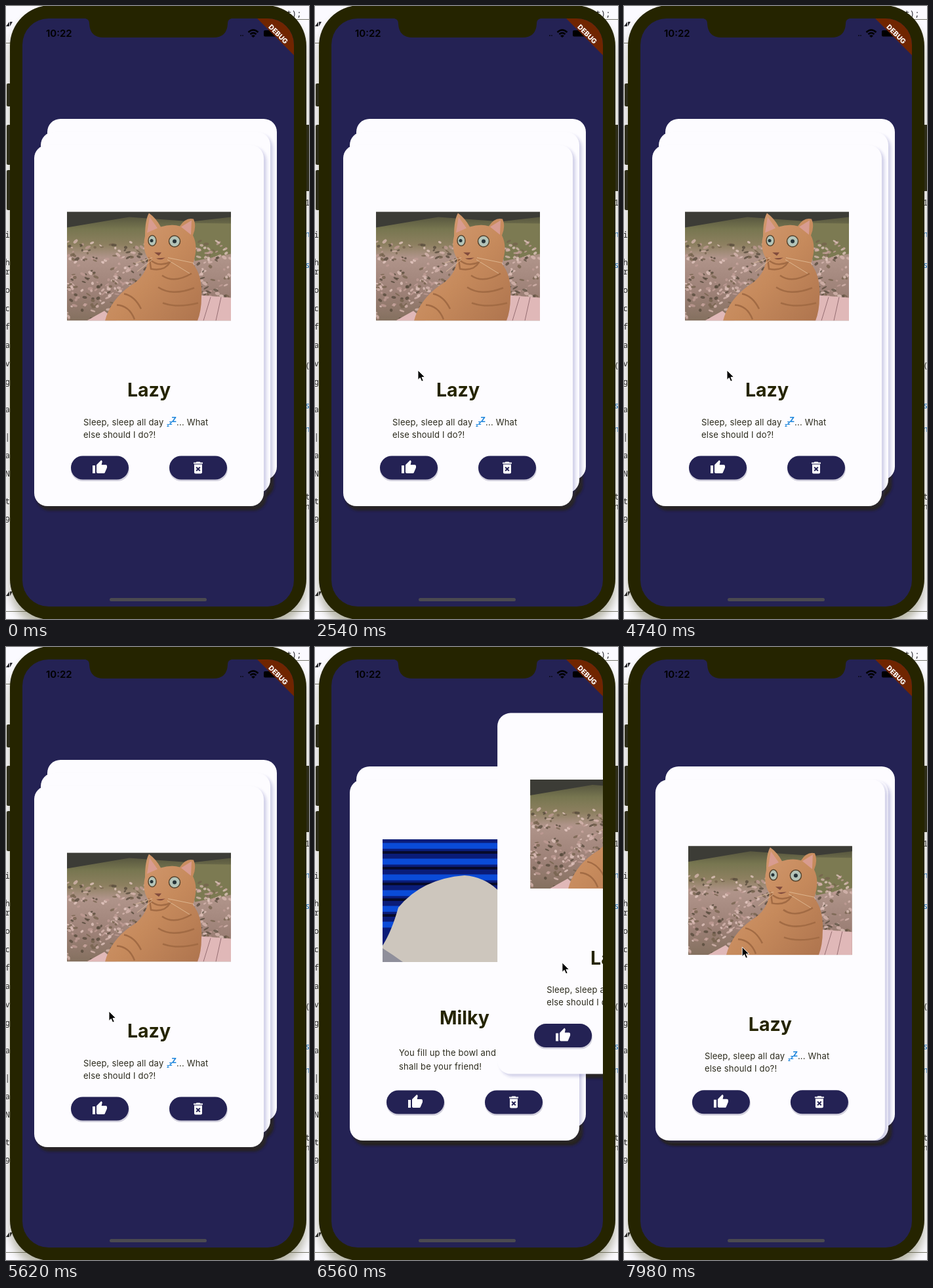
Recreate the animation shown at these times as an HTML page. Size 462x934 px, loop 8000 ms.

```html
<!DOCTYPE html>
<html lang="en">
<head>
<meta charset="utf-8">
<title>Cat cards</title>
<style>
  html, body { margin: 0; width: 100%; height: 100%; overflow: hidden; }
  svg { display: block; }
  text { font-family: Inter, Roboto, sans-serif; }
  .code text { font: 12.5px "Noto Sans Mono", "DejaVu Sans Mono", monospace; fill: #25252a; }
  .code .link { fill: #1673cf; }
  .bezel { fill: #252400; }
  .navy { fill: #242254; }
  .paper { fill: #fdfcff; }
  .dark { fill: #252400; }
  .soft { fill: #3c3c96; fill-opacity: .22; }
  .title { font-size: 28.5px; font-weight: 700; fill: #252400; text-anchor: middle; }
  .copy { font-size: 13px; letter-spacing: .2px; fill: #2b2a1c; }
  .zzz { fill: #1f86dc; font-weight: 800; }
  .icon { fill: #fff; }
</style>
</head>
<body>
<svg id="stage" width="462" height="934" viewBox="0 0 462 934">
  <defs>
    <linearGradient id="litter" x2="0" y2="1">
      <stop offset="0" stop-color="#4b4a38"/>
      <stop offset=".16" stop-color="#777650"/>
      <stop offset=".3" stop-color="#8d8060"/>
      <stop offset=".42" stop-color="#b0948a"/>
      <stop offset=".75" stop-color="#9c8076"/>
      <stop offset="1" stop-color="#84705f"/>
    </linearGradient>
    <linearGradient id="fur" x2="1" y2="1">
      <stop offset="0" stop-color="#d8a078"/>
      <stop offset=".55" stop-color="#c68a5c"/>
      <stop offset="1" stop-color="#ae744e"/>
    </linearGradient>
    <filter id="haze" x="-10%" y="-10%" width="120%" height="120%"><feGaussianBlur stdDeviation="7"/></filter>
    <filter id="blur" x="-10%" y="-10%" width="120%" height="120%"><feGaussianBlur stdDeviation="2"/></filter>
    <clipPath id="screen"><rect x="25" y="19" width="414" height="896" rx="40"/></clipPath>
    <rect id="sheet" width="350" height="550" rx="20"/>

    <g id="buttons">
      <g fill="#24225433">
        <rect x="56" y="476" width="89" height="36" rx="18"/>
        <rect x="206" y="476" width="89" height="36" rx="18"/>
      </g>
      <g class="navy">
        <rect x="56" y="473.5" width="88" height="36" rx="18"/>
        <rect x="206" y="473.5" width="88" height="36" rx="18"/>
      </g>
      <path class="icon" transform="translate(88 479)" d="M1 21h4V9H1v12zm22-11c0-1.1-.9-2-2-2h-6.31l.95-4.57.03-.32c0-.41-.17-.79-.44-1.06L14.17 1 7.59 7.59C7.22 7.95 7 8.45 7 9v10c0 1.1.9 2 2 2h9c.83 0 1.54-.5 1.84-1.22l3.02-7.05c.09-.23.14-.47.14-.73z"/>
      <path class="icon" transform="translate(238 479.5)" d="M6 19c0 1.1.9 2 2 2h8c1.1 0 2-.9 2-2V7H6zm2.46-7.12 1.41-1.41L12 12.59l2.12-2.12 1.41 1.41L13.41 14l2.12 2.12-1.41 1.41L12 15.41l-2.12 2.12-1.41-1.41L10.59 14zM15.5 4l-1-1h-5l-1 1H5v2h14V4z"/>
    </g>
  </defs>

  <rect width="462" height="934" fill="#fbfaff"/>
  <path d="M0 56.5H20M0 922.5H40M440 20.5H462M420 922.5H462" stroke="#77776c"/>
  <path d="M0 31l5-7v7zM6 24h4l-4 7zM0 899l5-7v7zM6 892h4l-4 7z" fill="#25252a"/>
  <g class="code" id="code"></g>
  <rect x="6" y="12" width="452" height="936" rx="62" fill="#55552a" opacity=".4" filter="url(#haze)"/>

  <g fill="#2d2c18">
    <rect x="1" y="118" width="8" height="35" rx="2"/>
    <rect x="1" y="181" width="8" height="61" rx="2"/>
    <rect x="1" y="250" width="8" height="61" rx="2"/>
    <rect x="455" y="181" width="9" height="101" rx="2"/>
  </g>
  <rect class="bezel" x="6" y="-1" width="452" height="936" rx="62"/>
  <rect class="navy" x="25" y="19" width="414" height="896" rx="40"/>

  <g clip-path="url(#screen)">
    <g class="dark" opacity=".85">
      <g class="second"><use href="#sheet" x="5" y="7" filter="url(#blur)"/></g>
      <g class="front"><use href="#sheet" x="4" y="6" filter="url(#blur)"/></g>
    </g>

    <g class="third"><use href="#sheet" class="paper"/></g>

    <g class="second">
      <use href="#sheet" class="soft" x="4" y="4" filter="url(#blur)"/>
      <use href="#sheet" class="paper"/>
      <svg x="50" y="91" width="250" height="187">
        <rect width="250" height="187" fill="#0a1c78"/>
        <path d="M0 10H250M0 34H250M0 58H250M0 82H250M0 106H250M0 130H250" stroke="#0a4bd8" stroke-width="9"/>
        <path d="M0 20H250M0 44H250M0 68H250M0 92H250M0 116H250" stroke="#060a2c" stroke-width="4"/>
        <path d="M0 162Q14 140 24 104Q60 60 125 55Q200 60 225 187H0z" fill="#cdc6bd"/>
        <path d="M0 187V166Q16 176 31 187z" fill="#8f8f9b"/>
      </svg>
      <text class="title" x="175" y="373">Milky</text>
      <g class="copy">
        <text x="75" y="421">You fill up the bowl and I</text>
        <text x="75" y="442">shall be your friend!</text>
      </g>
      <use href="#buttons"/>
    </g>

    <g class="front">
      <use href="#sheet" class="soft" x="4" y="4" filter="url(#blur)"/>
      <use href="#sheet" class="paper"/>
      <svg x="50" y="101.5" width="250" height="166">
        <rect width="250" height="166" fill="url(#litter)"/>
        <path d="M0 0H250V8L190 15L95 8L0 24z" fill="#3c3c36"/>
        <path d="M182 17L250 18V64L195 75z" fill="#7c7a52"/>
        <g id="leaves"></g>
        <path d="M30 166L57 151L75 166zM201 127L250 131V166H195z" fill="#e0b8b8"/>
        <path d="M219 130L208 166M235 130L227 166" stroke="#956e72"/>
        <path d="M58 166Q66 135 96 113Q121 99 124 72Q114 57 119 37Q119 12 125 2Q136 10 143 23Q159 18 172 22Q181 8 193 11Q198 22 192 36Q201 54 192 79Q207 98 205 130Q205 151 199 166z" fill="url(#fur)"/>
        <path d="M122 32L126 8L138 25zM174 23L190 13L189 35z" fill="#d89c90"/>
        <path d="M126 72Q138 85 157 77Q149 91 128 87zM145 97Q163 110 190 94M139 115Q160 129 194 116M87 125Q103 128 113 148M76 142Q95 143 103 164M146 139Q168 147 200 139" fill="none" stroke="#a26b44" stroke-width="2.5"/>
        <path d="M133 62H144L140 67zM136 71Q142 75 150 70" fill="#814b3c"/>
        <g fill="#b4c4b8" stroke="#56442e" stroke-width="1.5">
          <ellipse cx="130" cy="44" rx="6" ry="8"/><circle cx="164" cy="45" r="8.5"/>
        </g>
        <circle cx="129" cy="44" r="2.5" fill="#263338"/><circle cx="164" cy="45" r="3" fill="#263338"/>
        <path d="M130 70L105 78M130 73L107 91M154 70L193 78M153 73L187 94" stroke="#e8cba7" stroke-width=".7"/>
      </svg>
      <text class="title" x="175" y="383">Lazy</text>
      <g class="copy">
        <text x="75" y="426.5">Sleep, sleep all day</text>
        <text x="217" y="426.5">... What</text>
        <text x="75" y="445.5">else should I do?!</text>
      </g>
      <g class="zzz">
        <text x="202" y="429" font-size="7">z</text>
        <text x="205.5" y="426" font-size="9">z</text>
        <text x="209.5" y="422" font-size="11">Z</text>
      </g>
      <use href="#buttons"/>
    </g>

    <path class="bezel" d="M121 19Q127 20 127 27Q128 48 149 48H316Q337 48 338 27Q338 20 344 19z"/>
    <text x="61" y="47" font-size="15" font-weight="600">10:22</text>
    <path d="M357 44h2v2h-2zM360 44h2v2h-2z" fill="#111128"/>
    <path d="M369.5 40Q377 33 384.5 40M372.5 43Q377 39 381.5 43" fill="none" stroke="#000" stroke-width="2.6"/>
    <path d="M374 45.5Q377 43 380 45.5L377 48z"/>
    <rect x="393" y="37" width="21" height="9.5" rx="2"/>
    <path d="M383 19H416L439 42V75z" fill="#702500"/>
    <text transform="translate(412.5 45.5) rotate(45)" text-anchor="middle" font-size="10.5" font-weight="800" fill="#fff">DEBUG</text>
    <rect x="158" y="902" width="148" height="5" rx="2.5" fill="#4b4a50"/>
  </g>

  <path id="pointer" d="M0 0V14.5L3.3 11.5L5.7 17L8.2 16L5.9 10.6H10.5z" fill="#000" stroke="#fff" stroke-width=".9"/>
</svg>

<script>
  const LOOP = 8000, LAG = 100, GRAB = 5900, HOME = [157, 555];

  // Pointer path: time, x, y
  const path = [
    [850, 474, 166], [1000, 446, 178], [1300, 405, 205], [1600, 380, 216], [1680, 380, 216],
    [1900, 325, 300], [2200, 210, 475], [2420, ...HOME], [GRAB, ...HOME],
    [5940, 166.5, 554], [6040, 256, 510], [6250, 372, 385], [6450, 393, 440],
    [6700, 340, 530], [6920, 248, 572], [7020, 179, 578], [7140, 190, 618],
    [7300, 235, 680], [7500, 255, 695], [7700, 210, 635], [7880, 162, 545.5], [7980, 180, 458], [8000, 183, 442]
  ];

  const byId = id => document.getElementById(id);
  function svgNode(parent, name, attrs, text = '') {
    const node = document.createElementNS('http://www.w3.org/2000/svg', name);
    for (const key in attrs) node.setAttribute(key, attrs[key]);
    node.textContent = text;
    parent.append(node);
  }

  const writeCode = (x, lines, cls = '') => lines.split(' ').forEach(line => {
    const [y, text] = line.split('~');
    svgNode(byId('code'), 'text', { x, y, class: cls }, text);
  });
  writeCode(-9, '353~pi 395~ih 409~er 437~co 465~ec 493~of 521~ca 549~av 577~ng 619~ta 661~-| 689~fa 717~IN 759~ot 787~39');
  writeCode(428, '16~t);');
  writeCode(456, '304~1 552~( 752~te 767~n');
  writeCode(456, '352~n 399~s 613~s 649~n', 'link');

  // Fallen leaves
  let seed = 7;
  const random = () => (seed = seed * 16807 % 2147483647) / 2147483647;
  const tones = ['#d8b8b2', '#54483a', '#c09c96', '#74624c', '#e4c8c2'];
  for (let i = 0; i < 480; i++) {
    const x = random() * 250, y = 45 + random() * 118;
    svgNode(byId('leaves'), 'ellipse', {
      cx: x, cy: y, rx: 1.5 + random() * 3, ry: 1 + random() * 1.5,
      fill: tones[i % tones.length], opacity: .75, transform: `rotate(${random() * 90 - 45} ${x} ${y})`
    });
  }

  const same = (a, b) => a[1] === b[1] && a[2] === b[2];
  function slope(i, axis) {
    const a = path[i - 1], b = path[i], c = path[i + 1];
    if (!a || !c || same(a, b) || same(b, c)) return 0;
    return (c[axis] - a[axis]) / (c[0] - a[0]);
  }

  // Cubic interpolation along the path
  function pointerAt(t) {
    let i = 0;
    while (i < path.length - 2 && path[i + 1][0] <= t) i++;
    const a = path[i], b = path[i + 1], span = b[0] - a[0];
    const u = Math.max(0, (t - a[0]) / span), v = 1 - u;
    return [1, 2].map(k =>
      v * v * (1 + 2 * u) * a[k] + u * u * (3 - 2 * u) * b[k] +
      span * u * v * (v * slope(i, k) - u * slope(i + 1, k)));
  }

  const place = (selector, x, y) => document.querySelectorAll(selector)
    .forEach(node => node.setAttribute('transform', `translate(${x} ${y})`));

  // The front card trails the pointer; the stack closes up while it is held
  function draw(t) {
    const dragging = t >= GRAB + LAG;
    const held = dragging ? pointerAt(t - LAG) : HOME;
    const drop = dragging ? 10 : 0;
    place('.third', 63, 172 + drop);
    place('.second', 53, 192 + drop);
    place('.front', 43 + held[0] - HOME[0], 212 + held[1] - HOME[1]);
    place('#pointer', ...pointerAt(t));
    byId('pointer').style.visibility = t < path[0][0] ? 'hidden' : 'visible';
  }

  const start = performance.now();
  function tick(now) {
    draw(Math.max(0, now - start) % LOOP);
    requestAnimationFrame(tick);
  }
  draw(0);
  requestAnimationFrame(tick);
</script>
</body>
</html>
```
